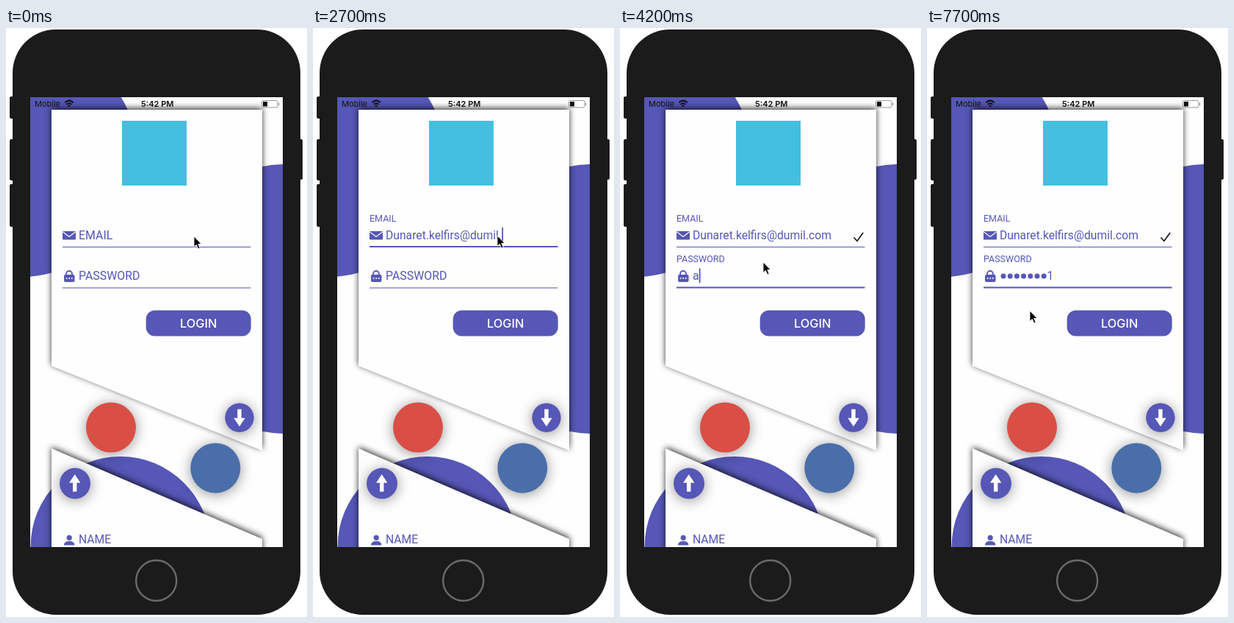
An HTML page for the animation above (8000 ms loop, 410x800 px).

```html
<!DOCTYPE html>
<html lang="en">
<head>
<meta charset="utf-8">
<title>Login form</title>
<style>
  html, body { margin: 0; width: 100%; height: 100%; overflow: hidden; background: #fff; }
  svg { display: block; width: 410px; height: 800px; --ink: #5657b6; }
  text { font-family: Roboto, "Open Sans", sans-serif; font-size: 15.7px; fill: var(--ink); white-space: pre; }
  .status { font: 11px Inter, sans-serif; fill: #111; }
  .bold { font-weight: 600; }
  .button { font: 500 16.4px Inter, sans-serif; fill: #fff; text-anchor: middle; }
  .ink { fill: var(--ink); }
  .card { fill: #fefefe; filter: drop-shadow(0 -2px 4px rgba(0, 0, 0, .8)); }
  .raised { filter: drop-shadow(0 2px 9px rgba(0, 0, 0, .42)); }
  .dots { fill: none; stroke: var(--ink); stroke-width: 7; stroke-linecap: round; stroke-dasharray: 0 9.2; }
</style>
</head>
<body>
<svg viewBox="0 0 410 800">
  <defs>
    <clipPath id="screen"><rect x="33" y="94" width="344" height="611"/></clipPath>
    <path id="arrow" d="M-2.7-11.5V.5H-7.7L0 12 7.7 .5H2.7V-11.5Z" fill="#fff"/>
  </defs>

  <g fill="#1b1b1b">
    <rect x="9" y="2" width="392" height="795" rx="59"/>
    <rect x="5" y="93" width="8" height="30" rx="2"/>
    <rect x="5" y="151" width="8" height="56" rx="2"/>
    <rect x="5" y="212" width="8" height="58" rx="2"/>
    <rect x="397" y="151" width="7" height="55" rx="2"/>
  </g>
  <circle cx="204.7" cy="750.5" r="27.5" fill="none" stroke="#6a6a6c" stroke-width="2.4"/>

  <g clip-path="url(#screen)">
    <rect x="33" y="94" width="344" height="611" fill="#fefefe"/>
    <g class="ink">
      <circle cx="20.4" cy="178" r="160.2"/>
      <circle cx="383" cy="368" r="183"/>
      <circle cx="156" cy="704.5" r="122.5"/>
    </g>
    <path class="card" d="M62 111H349V574L62 459Z"/>
    <path class="card" d="M62 571L349 694V730H62Z"/>

    <text class="status" x="39" y="107">Mobile</text>
    <g fill="none" stroke="#111" stroke-width="2">
      <path d="M80.2 101.2Q86 96 91.8 101.2M82.6 103.8Q86 100.8 89.4 103.8"/>
      <path d="M84 105.2L86 107.6 88 105.2Q86 103.8 84 105.2Z" fill="#111" stroke="none"/>
    </g>
    <text class="status bold" x="184" y="107">5:42 PM</text>
    <rect x="348.5" y="98.5" width="21.5" height="9.5" rx="2" fill="none" stroke="#999"/>
    <rect x="350" y="100" width="6" height="6.5" fill="#111"/>
    <path d="M371.5 101.5V105" stroke="#999" stroke-width="1.4"/>

    <rect x="158" y="126" width="88" height="88" fill="#43bfe0"/>

    <rect class="ink" x="77" y="276" width="18" height="11.5" rx="1"/>
    <path d="M77.5 277L86 283.5 94.5 277" fill="none" stroke="#fff" stroke-width="1.2"/>

    <path d="M82 336V334a4 4 0 0 1 8 0V336" fill="none" stroke="#5657b6" stroke-width="1.8"/>
    <rect class="ink" x="79" y="335" width="14.5" height="10" rx="2"/>
    <path d="M82.6 340H90.5" stroke="#fff" stroke-width="2" stroke-linecap="round" stroke-dasharray="0 3.6"/>

    <rect class="ink" x="190.7" y="383.5" width="143" height="35" rx="12"/>
    <text class="button" x="262.2" y="407.2">LOGIN</text>

    <g class="raised">
      <circle cx="143" cy="542.5" r="34" fill="#d94f45"/>
      <circle cx="285.3" cy="597.7" r="34" fill="#4a6ea9"/>
      <circle class="ink" cx="318" cy="529.3" r="19.7"/>
      <circle class="ink" cx="94" cy="618.6" r="21"/>
    </g>
    <use href="#arrow" x="318" y="529.3"/>
    <use href="#arrow" transform="translate(93.7 618.3) rotate(180)"/>

    <circle class="ink" cx="86.2" cy="692.3" r="3.6"/>
    <path class="ink" d="M79 702.5Q79 697 86.2 697T93.4 702.5Z"/>
    <text x="99" y="700">NAME</text>

    <rect id="emailLine" class="ink" x="77" width="256.5"/>
    <rect id="passLine" class="ink" x="77" width="256.5"/>
    <text id="emailLabel">EMAIL</text>
    <text id="passLabel">PASSWORD</text>
    <text id="email" x="99" y="286.8"></text>
    <path id="dots" class="dots"/>
    <text id="lastKey" y="342.2"></text>
    <path id="check" d="M318.5 284.5L323 289.3 331.2 278" fill="none" stroke="#111" stroke-width="1.6"/>
    <rect id="caret" class="ink" width="1.8" height="19.5"/>
  </g>

  <path id="pointer" d="M0 0V14.4L3.3 11.4 5.8 17 8.2 16 5.8 10.5H10.2Z" fill="#000" stroke="#fff" stroke-width=".9"/>
</svg>

<script>
const LOOP = 8000, TICK = 100, DOT = 9.2;
const ADDRESS = "Dunaret.kelfirs@dumil.com";
const SECRET = "abafdeg1";
const SECRET_TIMES = [4000, 4600, 4900, 5200, 5700, 6200, 6400, 7000];
const EMAIL_FOCUS = 300, PASS_FOCUS = 3500, CARET_OFF = 7400;
const TYPING = [[600, 2], [1400, 10], [2300, 18], [2400, 20], [2500, 21], [2700, 22], [3000, 25]];
const POINTER_X = [[0, 256], [100, 251], [3100, 251], [3500, 195], [7300, 195], [7700, 140]];
const POINTER_Y = [[0, 283], [100, 282], [3100, 282], [3500, 318], [7300, 318], [7700, 384]];

const el = id => document.getElementById(id);
const mix = (a, b, p) => a + (b - a) * p;
const set = (id, attrs) => {
  for (const key in attrs) el(id).setAttribute(key, attrs[key]);
};
const show = (id, on) => set(id, { visibility: on ? "visible" : "hidden" });

function along(keys, t) {
  const i = keys.findIndex(key => key[0] > t);
  if (i < 0) return keys[keys.length - 1][1];
  if (i === 0) return keys[0][1];
  const [t0, a] = keys[i - 1], [t1, b] = keys[i];
  return mix(a, b, (t - t0) / (t1 - t0));
}

// Floats a placeholder up to its small label position.
function placeLabel(id, baseline, t, start) {
  const raw = Math.min(1, Math.max(0, (t - start + TICK) / 300));
  const p = t < start ? 0 : 1 - (1 - raw) ** 2;
  set(id, { x: mix(99, 77, p), y: mix(baseline, baseline - 23.8, p) });
  el(id).style.fontSize = mix(15.9, 12.5, p) + "px";
}

function placeLine(id, bottom, focused) {
  const height = focused ? 2 : 1;
  set(id, { y: bottom - height, height });
}

function render(t) {
  const inEmail = t >= EMAIL_FOCUS && t < PASS_FOCUS;
  const inPass = t >= PASS_FOCUS;

  const count = t < 600 ? 0 : Math.floor(along(TYPING, t) + 1e-6);
  el("email").textContent = ADDRESS.slice(0, count);

  const keys = SECRET_TIMES.filter(time => time <= t).length;
  const lastX = 99 + DOT * Math.max(0, keys - 1);
  el("lastKey").textContent = keys ? SECRET[keys - 1] : "";
  set("lastKey", { x: lastX });
  set("dots", { d: `M104 337H${104 + DOT * (keys - 2) + .1}` });
  show("dots", keys > 1);

  placeLabel("emailLabel", 286.8, t, 600);
  placeLabel("passLabel", 342.2, t, 4000);
  placeLine("emailLine", 298, inEmail);
  placeLine("passLine", 353.5, inPass);
  show("check", inPass);

  const caretX = inPass
    ? lastX + el("lastKey").getComputedTextLength()
    : 99 + el("email").getComputedTextLength();
  set("caret", { x: caretX + .2, y: inPass ? 326.5 : 271 });
  show("caret", inEmail || (inPass && t < CARET_OFF));

  set("pointer", { transform: `translate(${along(POINTER_X, t)} ${along(POINTER_Y, t)})` });
}

function frame() {
  render(Math.floor(performance.now() % LOOP / TICK) * TICK);
  requestAnimationFrame(frame);
}
frame();
</script>
</body>
</html>
```
